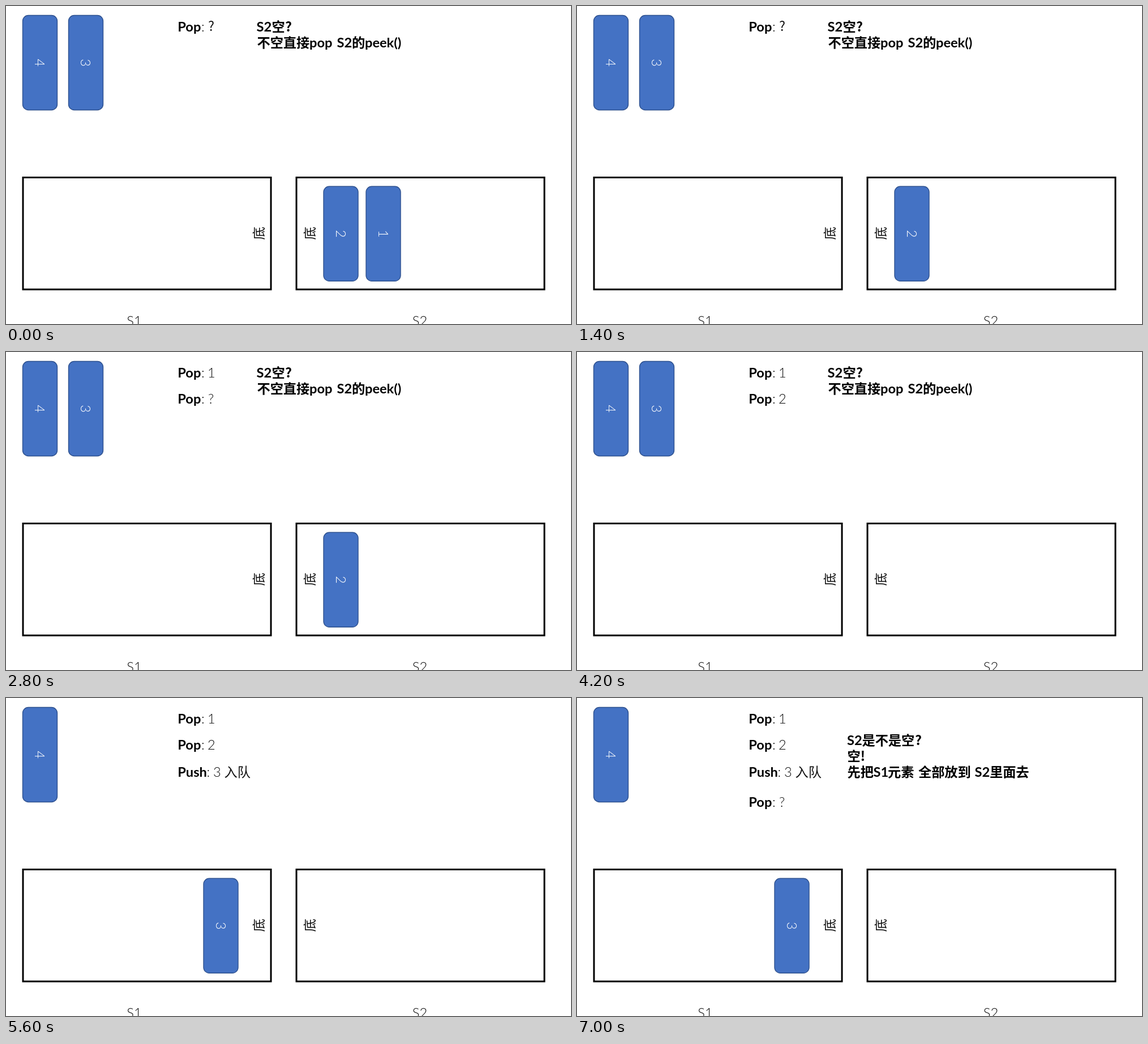
An HTML page for the animation above (8 s loop, 998 by 561 pixels).

```html
<!DOCTYPE html>
<html lang="zh-CN">
<head>
<meta charset="utf-8">
<title>Queue from two stacks</title>
<style>
  html, body { margin: 0; width: 100%; height: 100%; overflow: hidden; background: #fff; }
  svg { display: block; width: 998px; height: 561px; }
  text { font: 300 23.6px Lato, "Noto Sans CJK SC", sans-serif; fill: #111; white-space: pre; }
  .b { font-weight: 700; fill: #000; }
  .c { font-family: "Noto Sans CJK SC", "Noto Sans CJK", sans-serif; font-size: 23.2px; }
  .mid { text-anchor: middle; }
  .block rect { fill: #4472c4; stroke: #2f528f; stroke-width: 1.4; }
  .block text { fill: #fff; text-anchor: middle; }
  .box { fill: #fff; stroke: #000; stroke-width: 3; }

  /* Hard cuts every 1.4 s: .tN hides after step N, .fN shows from step N */
  [class*="step"] { animation: 8s step-end infinite; }
  .t1 { animation-name: t1 !important; }
  .t2 { animation-name: t2 !important; }
  .t3 { animation-name: t3 !important; }
  .t4 { animation-name: t4 !important; }
  .f2 { animation-name: f2 !important; }
  .f3 { animation-name: f3 !important; }
  .f4 { animation-name: f4 !important; }
  .f5 { animation-name: f5 !important; }
  .f2t3 { animation-name: f2t3 !important; }
  @keyframes t1 { 0% { opacity: 1 } 17.5%, 100% { opacity: 0 } }
  @keyframes t2 { 0% { opacity: 1 } 35%, 100% { opacity: 0 } }
  @keyframes t3 { 0% { opacity: 1 } 52.5%, 100% { opacity: 0 } }
  @keyframes t4 { 0% { opacity: 1 } 70%, 100% { opacity: 0 } }
  @keyframes f2 { 0% { opacity: 0 } 35%, 100% { opacity: 1 } }
  @keyframes f3 { 0% { opacity: 0 } 52.5%, 100% { opacity: 1 } }
  @keyframes f4 { 0% { opacity: 0 } 70%, 100% { opacity: 1 } }
  @keyframes f5 { 0% { opacity: 0 } 87.5%, 100% { opacity: 1 } }
  @keyframes f2t3 { 0% { opacity: 0 } 35% { opacity: 1 } 52.5%, 100% { opacity: 0 } }
</style>
</head>
<body>
<svg viewBox="0 0 998 561">
  <defs>
    <rect id="card" width="61" height="167" rx="10"/>
  </defs>

  <rect class="box" x="30" y="302.5" width="438" height="197.5"/>
  <rect class="box" x="513" y="302.5" width="438" height="197.5"/>
  <text class="c mid" transform="translate(455 401) rotate(-90)">底</text>
  <text class="c mid" transform="translate(545 401) rotate(-90)">底</text>
  <text class="mid" x="226.5" y="563.5">S1</text>
  <text class="mid" x="731" y="563.5">S2</text>

  <g class="block" transform="translate(29.5 16.5)">
    <rect width="61" height="167" rx="10"/>
    <text transform="translate(21.5 83.5) rotate(90)">4</text>
  </g>
  <g class="step t4"><g class="block" transform="translate(110.5 16.5)">
    <rect width="61" height="167" rx="10"/>
    <text transform="translate(21.5 83.5) rotate(90)">3</text>
  </g></g>
  <g class="step f4"><g class="block" transform="translate(349 318.3)">
    <rect width="61" height="167" rx="10"/>
    <text transform="translate(21.5 83.5) rotate(90)">3</text>
  </g></g>
  <g class="step t3"><g class="block" transform="translate(561 318.3)">
    <rect width="61" height="167" rx="10"/>
    <text transform="translate(21.5 83.5) rotate(90)">2</text>
  </g></g>
  <g class="step t1"><g class="block" transform="translate(636 318.3)">
    <rect width="61" height="167" rx="10"/>
    <text transform="translate(21.5 83.5) rotate(90)">1</text>
  </g></g>

  <text y="44.5"><tspan class="b" x="303.3">Pop</tspan><tspan x="345">:</tspan></text>
  <text class="step t2 c" x="357" y="43.5">?</text>
  <text class="step f2" x="356" y="44.5">1</text>

  <g class="step f2">
    <text y="90.5"><tspan class="b" x="303.3">Pop</tspan><tspan x="345">:</tspan></text>
  </g>
  <text class="step f2t3" x="357" y="90.5">?</text>
  <text class="step f3" x="356" y="90.5">2</text>

  <text class="step f4" y="139"><tspan class="b" x="303.3">Push</tspan><tspan x="354.5">:</tspan><tspan x="366">3</tspan><tspan class="c" x="385.5">入队</tspan></text>

  <g class="step f5">
    <text y="192"><tspan class="b" x="303.3">Pop</tspan><tspan x="345">:</tspan><tspan x="357">?</tspan></text>
    <text class="b" y="83"><tspan x="477">S2</tspan><tspan class="c" x="503.5">是不是空</tspan><tspan class="c" x="597">?</tspan></text>
    <text class="b" y="111"><tspan class="c" x="477.5">空</tspan><tspan class="c" x="500.5">!</tspan></text>
    <text class="b" y="139"><tspan class="c" x="477.5">先把</tspan><tspan x="523.5">S1</tspan><tspan class="c" x="549">元素</tspan><tspan class="c" x="603">全部放到</tspan><tspan x="702.5">S2</tspan><tspan class="c" x="729">里面去</tspan></text>
  </g>

  <g class="step t4">
    <text class="b" y="44.5"><tspan x="442.5">S2</tspan><tspan class="c" x="469.5">空</tspan><tspan class="c" x="493">?</tspan></text>
    <text class="b" y="72.5"><tspan class="c" x="443.5">不空直接</tspan><tspan x="536">pop</tspan><tspan x="584.5">S2</tspan><tspan class="c" x="611">的</tspan><tspan x="634">peek()</tspan></text>
  </g>
</svg>
</body>
</html>
```
